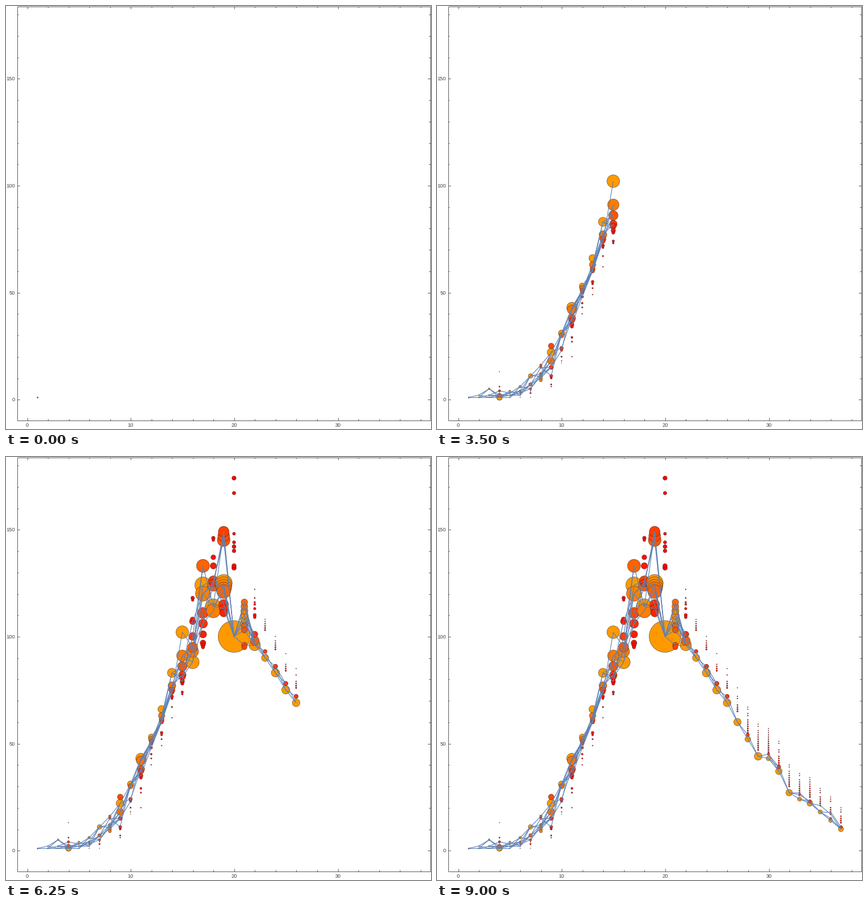
These frames come from a looping animation (750x746 px, 9.25 s). A matplotlib script:

```python
import random
import numpy as np
import matplotlib.pyplot as plt
from matplotlib.animation import FuncAnimation
from matplotlib.collections import LineCollection, PatchCollection
from matplotlib.patches import Circle

W, H, DPI = 750, 746, 100
COLUMNS, INTERVAL, ROUTES = 37, 250, 10
PX = 72 / DPI
LEFT, RIGHT, TOP, BOTTOM = 19.5, 748.5, 0.5, 730.5
BLUE, GREY = "#5e81b5", "#5a5a5a"
rng = random.Random(4)

fig = plt.figure(figsize=(W / DPI, H / DPI), dpi=DPI, facecolor="white")
ax = fig.add_axes([0, 0, 1, 1])
ax.set(xlim=(0, W), ylim=(H, 0))
ax.axis("off")


def to_px(x, y):
    return 37.2 + 18.26 * x, 693.9 - 3.774 * y


def draw_frame():
    """Frame box with inward ticks on all four sides."""
    segments = [[(LEFT, y), (RIGHT, y)] for y in (TOP, BOTTOM)]
    segments += [[(x, TOP), (x, BOTTOM)] for x in (LEFT, RIGHT)]
    font = dict(family="Liberation Sans", size=9.4 * PX, color="#444444",
                va="center_baseline")
    for v in range(0, 39, 2):
        x = int(to_px(v, 0)[0]) + 0.5
        size = 2.5 if v % 10 else 4.5
        segments += [[(x, BOTTOM), (x, BOTTOM - size)], [(x, TOP), (x, TOP + size)]]
        if v % 10 == 0:
            ax.text(x, 738.5, str(v), ha="center", **font)
    for v in range(0, 181, 10):
        y = int(to_px(0, v)[1]) + 0.5
        size = 2.5 if v % 50 else 4.5
        segments += [[(LEFT, y), (LEFT + size, y)], [(RIGHT, y), (RIGHT - size, y)]]
        if v % 50 == 0:
            ax.text(16, y, str(v), ha="right", **font)
    ax.add_collection(LineCollection(segments, colors=GREY, linewidths=PX, zorder=1))


discs = {x: [] for x in range(1, COLUMNS + 1)}


def add(x, largest, *values, smallest=0.8):
    """Discs in one column, shrinking from the first value to the last."""
    rank = np.linspace(0, 1, len(values)) ** 1.4
    discs[x] += zip(values, largest * (smallest / largest) ** rank)


# Climb
add(1, 1, 1)
add(2, 1, 1, 2)
add(3, 1.5, 5, 2, 1)
add(4, 5, 1)
add(4, 5, 1, 2, 4, 6, 13, smallest=0.5)
add(5, 1.5, *range(4, 0, -1))
add(6, 2.3, 6, *range(4, 0, -1), smallest=0.5)
add(7, 4, 11, 7, 5, 3, 4, 1, smallest=0.4)
add(8, 3, 11, 10, 9, 12, 16, 15, smallest=2)
add(9, 7.2, 22, 18, 25, 15, 11, 10, 7, 6)
add(10, 5.6, 31, 30, 24, 23, 20, 18, 17, smallest=0.4)
add(11, 9.2, 43, 42, 38, 37, 35, 34, 29, 27, 20)
add(12, 5.3, *range(53, 49, -1), 48, 45, 43, 40)
add(13, 6.5, 66, 63, 61, 60, 55, 54, 52, 49)
add(14, 8, 83, 77, 75, 74, 72, 71, 67, 62)
add(15, 11.2, 102, 91, 86, 82, 81, 79, 78, 74, 73, smallest=1.5)

# Peak
add(16, 11.6, 88, 93, 95, 100, 107, 108, 118, 117, smallest=2.3)
add(17, 14.4, 124, 120, 133, 111, 106, 101, 97, 96, 95, smallest=3)
add(18, 13.6, 114, 112, 124, 126, 125, 133, 137, 146, 145, smallest=2.4)
add(19, 15, *range(125, 120, -1), 145, 147, 149, *range(115, 110, -2), smallest=7)
add(20, 28, 100)
add(20, 4, 132, 133, 174, 142, 140, 167, 144, 148, smallest=2.6)
add(21, 6.9, *range(106, 117, 2), 105, 103, 96, 95, smallest=4.5)
add(22, 10, 96, 98, 101, smallest=5.5)
add(22, 2.8, 110, 109, 113, 115, 116, 118, 122)

# Decline: one leader per column, a runner-up and a thinning trail of specks
leaders = 90, 83, 75, 69, 60, 52, 44, 43, 37, 27, 24, 22, 18, 14, 10
radii = 6.3, 7.3, 7.2, 6.8, 6.5, 5, 6.8, 4, 5.8, 5.8, 3.6, 5, 3.7, 3.3, 4.6
for x, (leader, radius) in enumerate(zip(leaders, radii), 23):
    add(x, radius, leader)
    if x not in (27, 29, 32, 35):
        add(x, 0.55 * radius, leader + round(3 - 0.16 * (x - 24)))
    low = leader + max(3, 13 - 2 * (x - 23))
    high = leader + round(18 - 0.55 * (x - 23))
    trail = [y for y in range(low, high)
             if rng.random() < 1.2 - 0.8 * (y - low) / (high - low)]
    add(x, 1.3, *trail, high, smallest=0.6)


def pick_stop(x):
    """A large disc of the column, the larger the likelier."""
    limit = 0.35 * max(r for _, r in discs[x])
    stops = [d for d in discs[x] if d[1] > limit]
    return rng.choices([y for y, _ in stops], [r ** 1.5 for _, r in stops])[0]


routes = [[pick_stop(x) for x in discs] for _ in range(ROUTES)]


def column_discs(x):
    """Largest disc at the back; hue runs from red to orange with area."""
    items = sorted(discs[x], key=lambda d: -d[1])
    largest = items[0][1]
    colors = [(1, 0.6 * (r / largest) ** 2, 0) for _, r in items]
    circles = [Circle(to_px(x, y), r) for y, r in items]
    return PatchCollection(circles, facecolors=colors, edgecolors=(0.1, 0.1, 0.1, 0.65),
                           linewidths=0.7 * PX, zorder=2 + x / 100, visible=False)


def column_links(x):
    """Every distinct link that arrives at column x."""
    links = {(r[x - 2], r[x - 1]) for r in routes} if x > 1 else ()
    segments = [[to_px(x - 1, a), to_px(x, b)] for a, b in sorted(links)]
    return LineCollection(segments, colors=BLUE, linewidths=1.15 * PX,
                          zorder=4, visible=False)


draw_frame()
layers = []
for x in discs:
    pair = column_discs(x), column_links(x)
    for artist in pair:
        ax.add_collection(artist)
    layers.append(pair)
start_dot, = ax.plot(*to_px(1, 1), "s", ms=2.6 * PX, mew=0, color=BLUE, zorder=5)


def update(frame):
    for i, pair in enumerate(layers):
        for artist in pair:
            artist.set_visible(i <= frame)
    start_dot.set_visible(frame == 0)
    return [start_dot]


anim = FuncAnimation(fig, update, frames=COLUMNS, interval=INTERVAL,
                     repeat=True, repeat_delay=0, blit=False)
plt.show()
```
